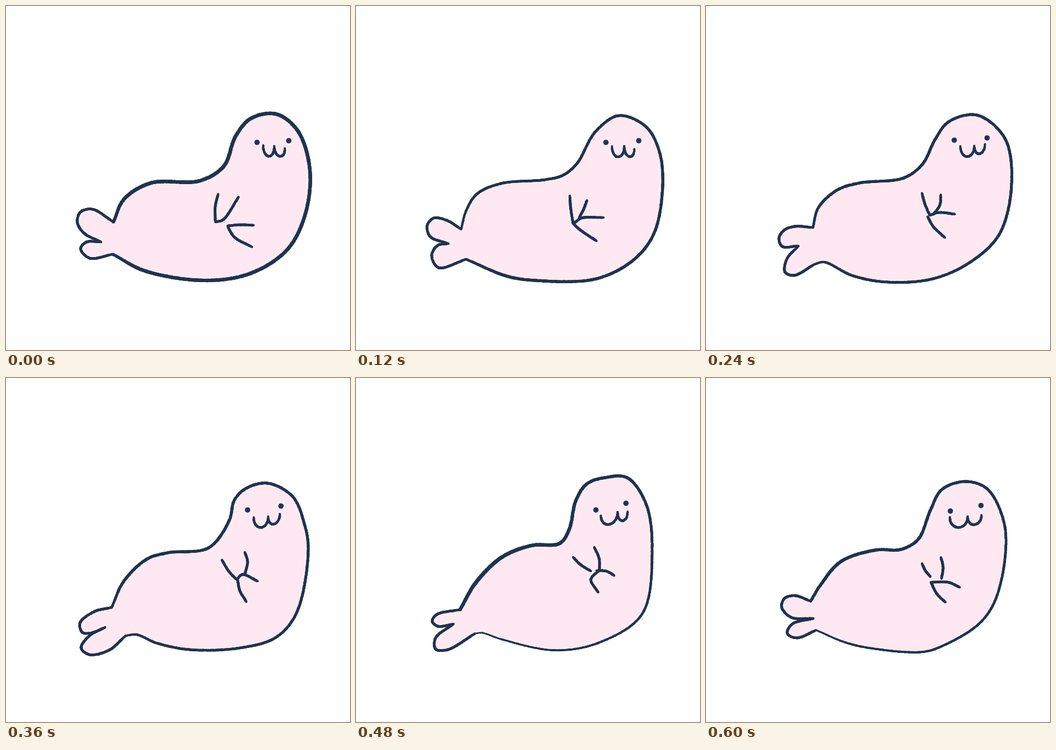
An HTML page with a canvas that plays this animation: 618x618 px, repeating every 0.72 s.

```html
<!DOCTYPE html>
<html lang="en">
<head>
<meta charset="utf-8">
<title>Seal</title>
<style>
html, body { margin: 0; width: 100%; height: 100%; overflow: hidden; background: #fff; }
canvas { display: block; }
</style>
</head>
<body>
<canvas id="stage" width="618" height="618"></canvas>
<script>
const ctx = document.getElementById('stage').getContext('2d');
const INK = '#20354f', SKIN = '#fee9f2', STEP = 120;

// Key points of each pose. body runs from the upper tail root over the head
// to the lower root; tail is upper fin | notch | lower fin; face is two eyes
// and three mouth tips; arms are short curves; ink is the outline weight.
const poses = [
  {
    ink: [6.5, 6.2],
    body: '193,388 212,347 260,318 348,314 391,288 413,233 440,202 485,194 524,224 546,295 537,376 505,438 440,480 360,493 250,476 192,446',
    tail: '155,365 134,370 128,388 140,408|171,424|145,424 134,436 150,453',
    face: '451,245 508,242 462,250 482,252 501,256',
    arms: '381,338 376,360 376,387|376,388 390,384 418,343|445,394 420,393 398,395|398,396 410,415 442,433'
  },
  {
    ink: [4.8, 5.6],
    body: '189,401 197,370 217,338 260,319 340,312 372,304 397,283 430,226 472,197 520,216 544,258 551,320 536,407 500,455 432,490 322,493 270,485 198,455',
    tail: '163,385 140,381 128,394 133,414|166,427|147,430 136,448 148,470',
    face: '449,245 508,242 460,252 482,252 500,257',
    arms: '384,341 386,365 390,391|391,392 405,404 432,422|391,391 405,381 445,380|401,380 409,365 415,349'
  },
  {
    ink: [5.3, 5],
    body: '192,398 202,362 235,331 275,318 355,309 389,284 412,239 436,208 487,196 537,238 549,320 527,410 475,460 408,490 325,496 262,484 212,460 195,464',
    tail: '160,396 140,403 131,418 137,432|166,431|145,455 142,478 158,484',
    face: '446,241 505,237 457,252 482,251 501,248',
    arms: '388,336 393,355 402,376|402,376 418,371 447,374|409,374 420,358 422,339|398,378 408,396 429,416'
  },
  {
    ink: [5.5, 4.8],
    body: '190,412 211,366 252,326 290,314 364,305 401,256 410,220 430,199 470,189 515,213 536,262 543,310 522,422 485,466 420,485 330,488 270,476 235,461 215,463',
    tail: '158,420 133,440 137,457 153,458|178,448|150,463 135,485 150,497 185,489',
    face: '434,237 494,230 445,250 471,249 492,244',
    arms: '388,327 400,347 414,362|415,361 425,353 452,365|429,313 434,330 429,353|416,362 420,382 432,402'
  },
  {
    ink: [7, 3.2],
    body: '187,416 215,368 262,322 315,301 366,297 383,272 395,220 415,190 447,179 487,179 521,226 532,310 514,424 435,476 355,489 260,469 227,458 214,459',
    tail: '145,425 137,437 147,446|175,442|143,467 143,487 165,488',
    face: '431,237 485,225 440,247 470,241 488,240',
    arms: '390,322 403,335 422,347|428,304 437,325 437,347|435,385 422,362 436,346|432,346 450,347 464,355'
  },
  {
    ink: [6, 3.8],
    body: '188,401 205,373 242,330 305,309 350,308 381,290 403,238 423,201 465,186 505,199 535,258 537,325 518,403 490,442 430,479 390,492 300,486 250,475 198,453',
    tail: '160,391 141,396 136,412 153,430|193,432|155,442 146,459 163,467',
    face: '439,239 494,229 438,250 470,249 495,246',
    arms: '388,333 394,346 403,357|422,322 426,340 423,361|456,376 435,367 404,367|404,367 415,388 430,403'
  }
];

const points = text => text.split(' ').map(s => s.split(',').map(Number));
const gap = (a, b) => Math.hypot(b[0] - a[0], b[1] - a[1]);
const mirror = (p, q) => [2 * p[0] - q[0], 2 * p[1] - q[1]];

function random(seed) {
  return () => (seed = (seed * 16807) % 2147483647) / 2147483647;
}

function bezier(a, b, c, d, t) {
  const s = 1 - t;
  return [0, 1].map(i => s * s * s * a[i] + 3 * s * t * (s * b[i] + t * c[i]) + t * t * t * d[i]);
}

function sample(a, b, c, d) {
  const n = Math.ceil(gap(a, d) / 0.5);
  return Array.from({ length: n + 1 }, (_, k) => bezier(a, b, c, d, k / n));
}

// Centripetal Catmull-Rom curve through the points.
function smooth(pts) {
  const out = [], end = pts.length - 1;
  for (let i = 0; i < end; i++) {
    const b = pts[i], c = pts[i + 1];
    const a = pts[i - 1] || mirror(b, c), d = pts[i + 2] || mirror(c, b);
    const u = Math.sqrt(gap(a, b)), v = Math.sqrt(gap(b, c)), w = Math.sqrt(gap(c, d));
    const p = [0, 1].map(k => b[k] + v / 3 * ((b[k] - a[k]) / u - (c[k] - a[k]) / (u + v) + (c[k] - b[k]) / v));
    const q = [0, 1].map(k => c[k] - v / 3 * ((c[k] - b[k]) / v - (d[k] - b[k]) / (v + w) + (d[k] - c[k]) / w));
    out.push(...sample(b, p, q, c));
  }
  return out;
}

// One half of the mouth: a bowl hanging between two tips.
function bowl(a, b, depth) {
  const drop = depth * 4 / 3;
  return sample(a, [a[0], a[1] + drop], [b[0], b[1] + drop], b);
}

function dot(x, y, r) {
  ctx.beginPath();
  ctx.arc(x, y, r, 0, Math.PI * 2);
  ctx.fill();
}

// Slightly rough crayon line, a little thinner at its ends.
function brush(line, rnd, from, to = from) {
  line.forEach(([x, y], i) => {
    const t = i / (line.length - 1);
    const w = (from + (to - from) * t) * (0.85 + 0.15 * Math.min(1, 5 * Math.sin(Math.PI * t)));
    dot(x + (rnd() - 0.5) * 0.6, y + (rnd() - 0.5) * 0.6, w / 2 - 0.45 + rnd() * 0.45);
  });
}

function draw(index) {
  const pose = poses[index], rnd = random(index + 71);
  const outline = points(pose.body);
  const [upper, notch, lower] = pose.tail.split('|').map(points);
  const body = smooth(outline);
  const up = smooth([outline[0], ...upper, ...notch]);
  const low = smooth([...notch, ...lower, outline[outline.length - 1]]);
  const [eyeL, eyeR, left, mid, right] = points(pose.face);

  ctx.fillStyle = '#fff';
  ctx.fillRect(0, 0, 618, 618);
  ctx.fillStyle = SKIN;
  ctx.beginPath();
  for (const p of [...body, ...low.slice().reverse(), ...up.slice().reverse()]) ctx.lineTo(...p);
  ctx.fill();

  ctx.fillStyle = INK;
  brush(body, rnd, ...pose.ink);
  const marks = pose.arms.split('|').map(s => smooth(points(s)));
  for (const line of [up, low, bowl(left, mid, 19), bowl(mid, right, 16), ...marks]) brush(line, rnd, 5);
  for (const eye of [eyeL, eyeR]) dot(...eye, 4.8);
}

let shown = -1;
function tick(now) {
  const index = Math.floor(now / STEP) % poses.length;
  if (index !== shown) draw(shown = index);
  requestAnimationFrame(tick);
}
tick(0);
</script>
</body>
</html>
```
